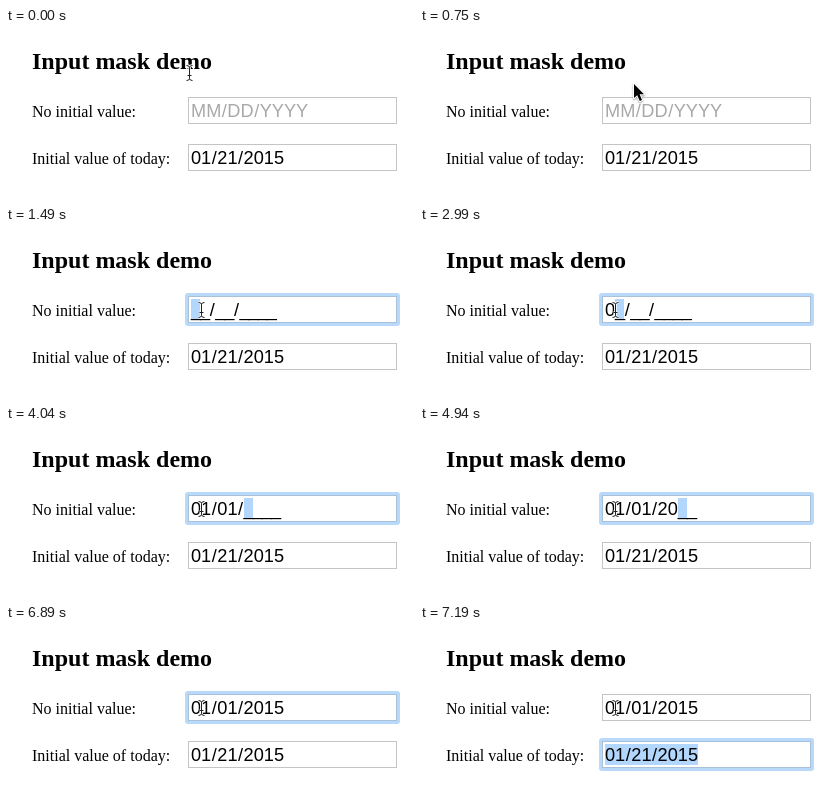
Recreate the animation shown at these times as an HTML page with a canvas. Size 408 by 171 pixels, loop 8 s.

```html
<!DOCTYPE html>
<html lang="en">
<head>
<meta charset="utf-8">
<title>Input mask demo</title>
<style>
html, body { margin: 0; width: 100%; height: 100%; overflow: hidden; background: #fff; }
canvas { display: block; }
</style>
</head>
<body>
<canvas id="stage" width="408" height="171"></canvas>
<script>
const ctx = document.getElementById('stage').getContext('2d');
const LOOP = 8000, SIZE = 18.2, LEFT = 185;
const SERIF = '"Liberation Serif", serif';
const SANS = `${SIZE}px "Liberation Sans", sans-serif`;

// Each list holds [start time, value]; a value lasts until the next start.
const cursors = [
  [0, ['beam', 184, 45]], [150, ['arrow', 205, 47]], [300, ['arrow', 214, 50]],
  [750, ['arrow', 214, 56]], [900, null], [1040, ['beam', 196, 83]],
];
const values = [
  [0, ''], [900, '__/__/____'], [2990, '0_/__/____'], [3140, '01/__/____'],
  [3890, '01/0_/____'], [4040, '01/01/____'], [4940, '01/01/20__'],
  [5240, '01/01/201_'], [5390, '01/01/2015'],
];
const focus = [[0, 0], [1490, 1], [7190, 2]];
const caret = [[0, false], [5390, true], [5840, false], [6440, true], [6890, false]];
const at = (list, t) => list.findLast(step => step[0] <= t)[1];

function label(text, y, font) {
  ctx.font = `${font} ${SERIF}`;
  ctx.fillStyle = '#000';
  ctx.fillText(text, 26, y);
}

function advance(char) {
  if (char === '_') return SIZE * 0.5;
  if (char === '/') return SIZE * 0.333;
  return ctx.measureText(char).width;
}

const widthOf = text => [...text].reduce((sum, char) => sum + advance(char), 0);

function field(y, text, color, focused, from, to) {
  if (focused) {
    ctx.fillStyle = '#b9d9fa';
    ctx.beginPath();
    ctx.roundRect(179, y - 3, 215, 33, 3);
    ctx.fill();
  }
  ctx.fillStyle = focused ? '#a9c0d8' : '#c4c4c4';
  ctx.fillRect(182, y, 209, 27);
  ctx.fillStyle = '#fff';
  ctx.fillRect(183, y + 1, 207, 25);

  ctx.font = SANS;
  if (to > from) {
    ctx.fillStyle = '#b3d6fd';
    ctx.fillRect(Math.round(LEFT + widthOf(text.slice(0, from))), y + 3,
      Math.round(widthOf(text.slice(from, to))), 21);
  }
  ctx.fillStyle = color;
  let x = LEFT;
  for (const char of text) {
    ctx.fillText(char, x + (char === '/' ? 0.5 : 0), y + 20);
    x += advance(char);
  }
}

function outlined(path, halo, line) {
  ctx.lineJoin = 'round';
  ctx.strokeStyle = '#fff';
  ctx.lineWidth = halo;
  ctx.stroke(path);
  ctx.strokeStyle = '#222';
  ctx.lineWidth = line;
  if (line) ctx.stroke(path);
}

const arrow = new Path2D('M0 0V14L3.2 11.2L5.8 17L8 16L5.6 10.3H10Z');
const beam = new Path2D('M-3.5-7.5Q-.5-7.5-.5-5.5Q-.5-7.5 2.5-7.5M-.5-5.5V5.5M-3.5 7.5Q-.5 7.5-.5 5.5Q-.5 7.5 2.5 7.5M-2.5 2.5H1.5');

function pointer([kind, x, y]) {
  ctx.save();
  ctx.translate(x, y);
  if (kind === 'beam') {
    outlined(beam, 2.5, 1);
  } else {
    ctx.shadowColor = '#0006';
    ctx.shadowBlur = 2;
    ctx.shadowOffsetY = 1;
    outlined(arrow, 2, 0);
    ctx.shadowColor = 'transparent';
    ctx.fillStyle = '#000';
    ctx.fill(arrow);
  }
  ctx.restore();
}

function draw(t) {
  ctx.fillStyle = '#fff';
  ctx.fillRect(0, 0, 408, 171);
  label('Input mask demo', 41, 'bold 24px');
  label('No initial value:', 89, '16px');
  label('Initial value of today:', 136, '16px');

  const value = at(values, t), active = at(focus, t), cursor = at(cursors, t);
  const slot = value.indexOf('_');
  const selected = active === 1 && slot >= 0;
  field(69, value || 'MM/DD/YYYY', value ? '#000' : '#a9a9a9', active === 1,
    selected ? slot : 0, selected ? slot + 1 : 0);
  field(116, '01/21/2015', '#000', active === 2, 0, active === 2 ? 10 : 0);

  if (at(caret, t)) {
    ctx.fillStyle = '#000';
    ctx.fillRect(279, 72, 1, 21);
  }
  if (cursor) pointer(cursor);
}

const start = performance.now();
function tick() {
  draw((performance.now() - start) % LOOP);
  requestAnimationFrame(tick);
}
tick();
</script>
</body>
</html>
```
